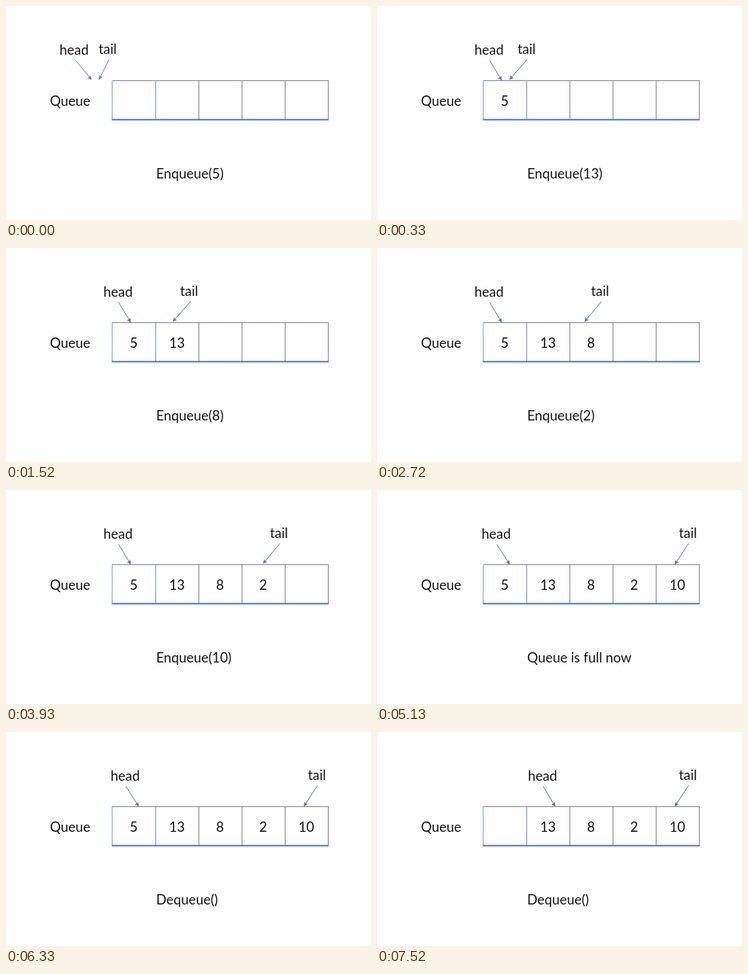
Animation, 457 px wide and 268 px high, one loop 8000 ms. Source, as an HTML page with a canvas:

```html
<!DOCTYPE html>
<html lang="en">
<head>
<meta charset="utf-8">
<title>Queue</title>
<style>
  html, body { margin: 0; width: 100%; height: 100%; overflow: hidden; background: #fff; }
  canvas { display: block; }
</style>
</head>
<body>
<canvas id="stage" width="457" height="268"></canvas>
<script>
const ctx = document.getElementById('stage').getContext('2d');
const LOOP = 8000, LEFT = 133, CELL = 54, TOP = 93.5, BOTTOM = 142;
const BLUE = '#6488c8', GREY = '#8b8c9c', SLATE = '#6f7c98';

// Pointers: label x, then arrow start and tip
const head = [[67, 87, 68, 107, 92], [122, 141, 68, 156, 93], [131, 150, 68, 166, 93], [189, 208, 68, 223, 93]];
const tail = [[116, 129, 67, 116.5, 92], [176, 188, 67, 166, 92], [218, 231, 67, 209, 92],
              [268, 281, 67, 260, 92], [330.5, 343, 67, 322, 92], [378, 390, 67, 373, 93]];

const steps = [
  { at: 0,    head: 0, tail: 0, from: 0, text: 'Enqueue(5)' },
  { at: 330,  head: 1, tail: 1, from: 0, text: 'Enqueue(13)' },
  { at: 1520, head: 1, tail: 2, from: 0, text: 'Enqueue(8)' },
  { at: 2720, head: 1, tail: 3, from: 0, text: 'Enqueue(2)' },
  { at: 3930, head: 1, tail: 4, from: 0, text: 'Enqueue(10)' },
  { at: 5130, head: 2, tail: 5, from: 0, text: 'Queue is full now' },
  { at: 6330, head: 2, tail: 5, from: 0, text: 'Dequeue()' },
  { at: 7520, head: 3, tail: 5, from: 1, text: 'Dequeue()' }
];
const values = [5, 13, 8, 2, 10];

function line(x1, y1, x2, y2, color, width = 1) {
  ctx.strokeStyle = color;
  ctx.lineWidth = width;
  ctx.beginPath();
  ctx.moveTo(x1, y1);
  ctx.lineTo(x2, y2);
  ctx.stroke();
}

function label(text, x, y, align = 'left') {
  ctx.fillStyle = '#111';
  ctx.textAlign = align;
  ctx.fillText(text, x, y);
}

function pointer(name, [x, x1, y1, x2, y2], y, color) {
  label(name, x, y);
  line(x1, y1, x2, y2, color);
  ctx.save();
  ctx.translate(x2, y2);
  ctx.rotate(Math.atan2(y2 - y1, x2 - x1));
  ctx.fillStyle = color;
  ctx.beginPath();
  ctx.moveTo(0.5, 0);
  ctx.lineTo(-4.5, -2.5);
  ctx.lineTo(-4.5, 2.5);
  ctx.fill();
  ctx.restore();
}

function grid() {
  const right = LEFT + 5 * CELL;
  line(LEFT, TOP, right + 1, TOP, GREY);
  for (let i = 0; i <= 5; i++) {
    const x = LEFT + i * CELL + 0.5 - (i === 0 ? 0.5 : 0);
    line(x, TOP, x, BOTTOM, i < 2 ? '#7f9bce' : GREY);
  }
  line(LEFT - 0.5, BOTTOM + 0.3, right + 1, BOTTOM + 0.3, '#4472c4', 1.8);
}

function draw(now) {
  const t = now % LOOP;
  const step = steps.findLast(s => s.at <= t);
  ctx.fillStyle = '#fff';
  ctx.fillRect(0, 0, 457, 268);
  ctx.font = '17px Lato, "Open Sans", sans-serif';
  grid();
  label('Queue', 55, 125);
  for (let i = step.from; i < step.tail; i++) {
    label(values[i], LEFT + (i + 0.5) * CELL, 125, 'center');
  }
  const color = step.tail ? SLATE : BLUE;
  pointer('head', head[step.head], 61, color);
  pointer('tail', tail[step.tail], 60, color);
  label(step.text, 188, 216);
}

function frame() {
  draw(performance.now());
  requestAnimationFrame(frame);
}
frame();
</script>
</body>
</html>
```
